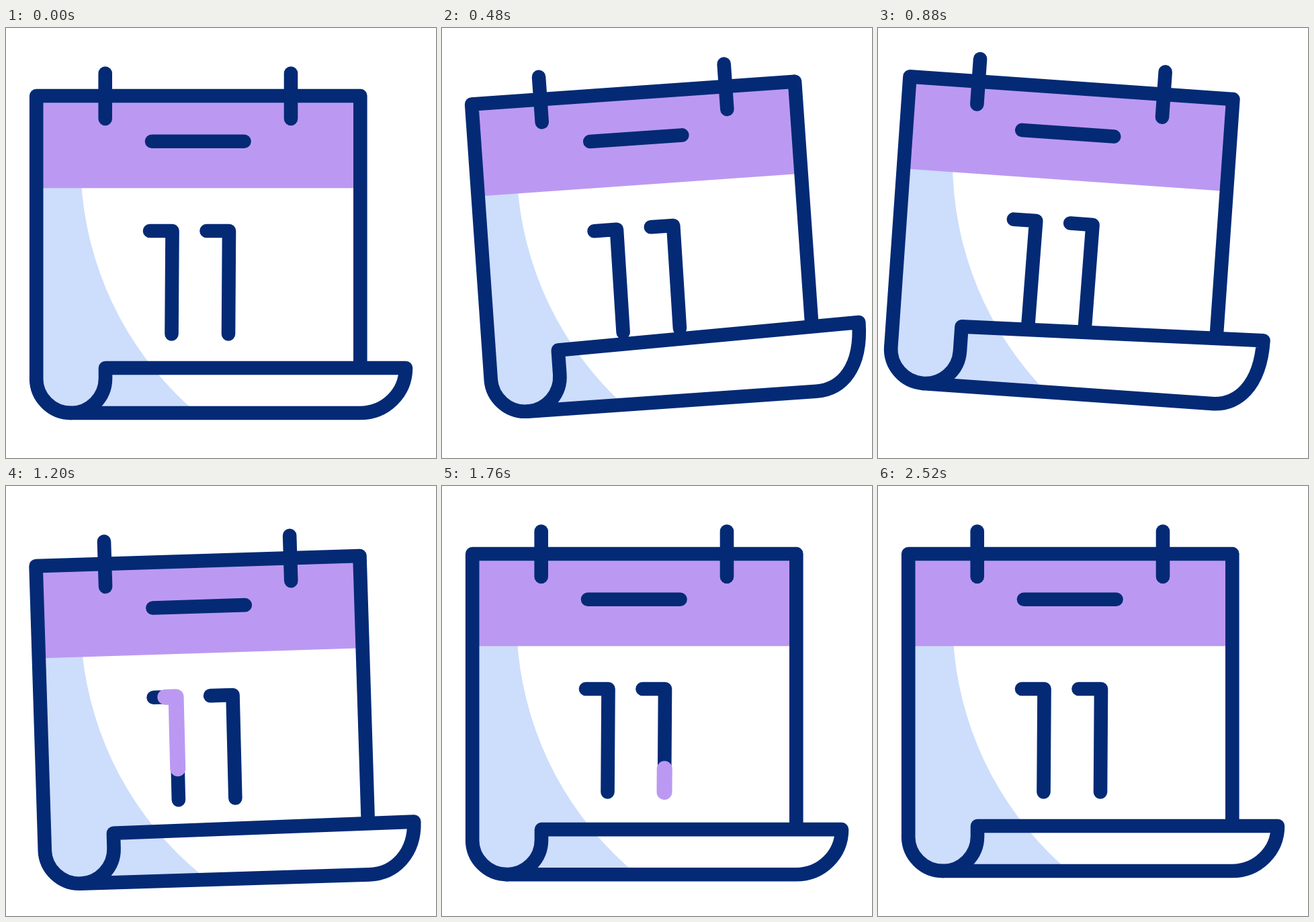
An HTML page with a canvas that plays this animation: 640 px wide and 640 px high, repeating every 2.88 s.

```html
<!DOCTYPE html>
<html lang="en">
<head>
<meta charset="utf-8">
<title>Bouncing calendar</title>
<style>
  html, body { margin: 0; width: 100%; height: 100%; overflow: hidden; background: #fff; }
  canvas { display: block; width: 100vw; height: 100vh; }
</style>
</head>
<body>
<canvas id="stage" width="640" height="640"></canvas>
<script>
const ctx = document.getElementById('stage').getContext('2d');
const NAVY = '#042a75', PURPLE = '#bb99f2', BLUE = '#cdddfc', WHITE = '#fff';
const LOOP = 2880, STEP = 40, LAST = 2520;
const PIVOT = { x: 286, y: 125 };
const LINE = 20.6;

// [time, value] pairs, eased between neighbours
const TILT = [[0, 0], [480, -4], [880, 4], [1240, -2], [1600, 0]];
const BOUNCE = [[0, 0], [320, 20], [670, -36], [1100, 14], [1460, -4], [1720, 0]];
const STRETCH = [[0, 0], [320, 25], [640, -45], [1130, 11], [1270, -6], [1740, 5.2], [2400, 0]];

const clamp = v => Math.min(1, Math.max(0, v));
const smooth = v => { const k = clamp(v); return k * k * (3 - 2 * k); };

function track(keys, t) {
  for (let i = 1; i < keys.length; i++) {
    const [t0, a] = keys[i - 1], [t1, b] = keys[i];
    if (t <= t1) return a + (b - a) * smooth((t - t0) / (t1 - t0));
  }
  return keys[keys.length - 1][1];
}

function liftAt(t) {
  return t < 640 ? 62 * smooth((t - 320) / 320) : 62 * (1 - clamp((t - 640) / 1210)) ** 3;
}

function polyline(points) {
  const path = new Path2D();
  points.forEach(([x, y]) => path.lineTo(x, y));
  return path;
}

function stroke(path, color = NAVY, width = LINE) {
  ctx.strokeStyle = color;
  ctx.lineWidth = width;
  ctx.stroke(path);
}

// Paper tint: the lit circle stays fixed on the stage while the paper moves
function fillPaper(path) {
  ctx.save();
  ctx.clip(path);
  ctx.setTransform(1, 0, 0, 1, 0, 0);
  ctx.fillStyle = BLUE;
  ctx.fillRect(0, 0, 640, 640);
  ctx.fillStyle = WHITE;
  ctx.beginPath();
  ctx.arc(602, 199, 491, 0, Math.PI * 2);
  ctx.fill();
  ctx.restore();
}

function drawDigit(x, t, start) {
  const path = polyline([[x, 302], [x + 33.5, 302], [x + 32.5, 455.5]]);
  const length = 187;
  stroke(path);
  const head = length * smooth((t - start) / 400);
  const tail = length * smooth((t - start - 195) / 400);
  if (head - tail < 0.5) return;
  ctx.setLineDash([head - tail, 1000]);
  ctx.lineDashOffset = -tail;
  stroke(path, PURPLE, 23);
  ctx.setLineDash([]);
}

function draw(t) {
  const stretch = track(STRETCH, t), lift = liftAt(t);
  const bottom = 573 + stretch, rollY = 521.5 + stretch;
  const leftY = 506 + stretch - lift * 0.67, rightY = 506 + stretch - lift;
  const rightX = 595 + lift * 0.075;

  ctx.setTransform(1, 0, 0, 1, 0, 0);
  ctx.fillStyle = WHITE;
  ctx.fillRect(0, 0, 640, 640);
  ctx.translate(PIVOT.x, PIVOT.y + track(BOUNCE, t));
  ctx.rotate(track(TILT, t) * Math.PI / 180);
  ctx.translate(-PIVOT.x, -PIVOT.y);
  ctx.lineCap = ctx.lineJoin = 'round';

  const page = polyline([[45, 101], [527, 101], [527, rightY], [148, leftY], [148, rollY]]);
  page.arc(96.5, rollY, 51.5, 0, Math.PI);
  page.closePath();
  fillPaper(page);

  ctx.fillStyle = PURPLE;
  ctx.fillRect(45, 101, 482, 137.3);

  drawDigit(214, t, 930);
  drawDigit(298.5, t, 1275);
  stroke(polyline([[527.3, 101], [527.3, rightY + 3]]));

  const curl = polyline([[148, leftY], [rightX, rightY]]);
  curl.bezierCurveTo(rightX, bottom - 30, 565, bottom, 527, bottom);
  curl.lineTo(96.5, bottom);
  curl.arc(96.5, rollY, 51.5, Math.PI / 2, 0, true);
  curl.closePath();
  fillPaper(curl);
  stroke(curl);

  const spine = polyline([[527, 101], [45.2, 101], [45.2, rollY]]);
  spine.arc(96.5, rollY, 51.4, Math.PI, Math.PI / 2, true);
  stroke(spine);

  for (const x of [147.7, 424]) stroke(polyline([[x, 67.5], [x, 135]]));
  stroke(polyline([[217, 168.7], [354.5, 168.7]]));
}

const began = performance.now();
function tick() {
  const t = (performance.now() - began) % LOOP;
  draw(Math.min(LAST, Math.floor(t / STEP) * STEP));
  requestAnimationFrame(tick);
}
tick();
</script>
</body>
</html>
```
